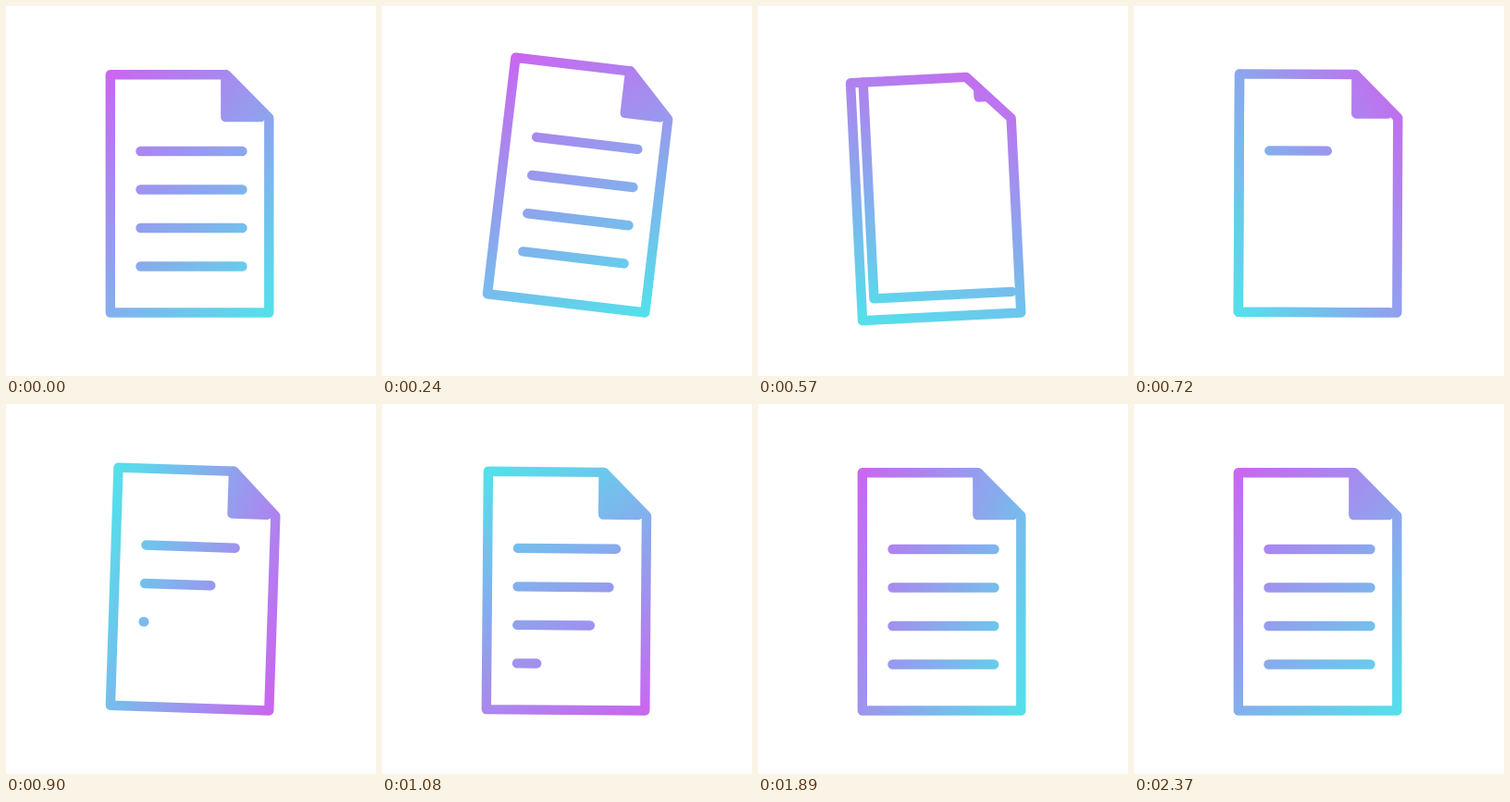
Write an HTML page that moves like this. It is 400 px wide and 400 px high and loops after 4400 ms.

```html
<!DOCTYPE html>
<html lang="en">
<head>
<meta charset="utf-8">
<title>Page turn</title>
<style>
  html, body { margin: 0; width: 100%; height: 100%; overflow: hidden; background: #fff; }
  svg { display: block; width: 100%; height: 100%; }
  .ink { fill: none; stroke: url(#tint); stroke-width: 10.4; stroke-linecap: round; stroke-linejoin: round; }
</style>
</head>
<body>
<svg viewBox="0 0 400 400">
  <defs>
    <linearGradient id="tint" gradientUnits="userSpaceOnUse">
      <stop offset="0" stop-color="#c967f0"/>
      <stop offset="1" stop-color="#54e0eb"/>
    </linearGradient>
  </defs>
  <g id="doc">
    <path id="oldLines" class="ink"/>
    <g id="turn">
      <path id="back" fill="#fff"/>
      <path id="shade" fill="url(#tint)"/>
      <path id="crease" class="ink"/>
    </g>
    <path id="newLines" class="ink"/>
    <g id="ear">
      <path id="earFill" fill="url(#tint)"/>
      <path id="earEdge" class="ink"/>
    </g>
    <path class="ink" d="M112.8 74.2H238L284.3 121V331.5H112.8Z"/>
  </g>
</svg>
<script>
const LOOP = 4400;
const L = 112.8, T = 74.2, R = 284.3, B = 331.5;
const FOLD = { x: 237.4, y: 120 };
const CUT = { x: 238, y: 121 };
const LINE = { x: 145.5, len: 110, ys: [157, 198.5, 240, 281.5] };
const SWING = [[0, 0], [275, 7], [540, -3], [850, 2], [1200, 0]];

const el = id => document.getElementById(id);
const set = (id, attrs) => {
  for (const k in attrs) el(id).setAttribute(k, attrs[k]);
};
const show = (id, on) => set(id, { visibility: on ? 'visible' : 'hidden' });
const span = (t, start, length) => Math.min(1, Math.max(0, (t - start) / length));
const mix = (a, b, p) => a + (b - a) * p;

const quadInOut = u => u < .5 ? 2 * u * u : 1 - 2 * (1 - u) ** 2;
const powOut = (u, n) => 1 - (1 - u) ** n;
const expoOut = u => u >= 1 ? 1 : 1 - 2 ** (-10 * u);

// cubic-bezier(.3, 0, .5, 1), solved by bisection
function spinEase(u) {
  let lo = 0, hi = 1;
  for (let i = 0; i < 24; i++) {
    const s = (lo + hi) / 2, r = 1 - s;
    if (.9 * s * r * r + 1.5 * s * s * r + s ** 3 < u) lo = s; else hi = s;
  }
  return lo * lo * (3 - 2 * lo);
}

function swing(t) {
  for (let i = 1; i < SWING.length; i++) {
    const [t0, a] = SWING[i - 1], [t1, b] = SWING[i];
    if (t < t1) return mix(a, b, quadInOut(span(t, t0, t1 - t0)));
  }
  return 0;
}

function drawTint(t) {
  const a = (225 + 360 * spinEase(span(t, 0, 2400))) * Math.PI / 180;
  const c = Math.cos(a), s = Math.sin(a);
  const half = (Math.abs(c) * (R - L) + Math.abs(s) * (B - T)) / 2;
  const cx = (L + R) / 2, cy = (T + B) / 2;
  set('tint', { x1: cx + c * half, y1: cy + s * half, x2: cx - c * half, y2: cy - s * half });
}

function drawTurn(t) {
  const p = powOut(span(t, 247, 484), 2);
  const x = mix(FOLD.x, L, p), y = mix(FOLD.y, B, p);
  const area = `M${x} ${T}H${CUT.x}L${R} ${CUT.y}V${y}H${x}Z`;
  set('back', { d: area });
  set('shade', { d: area, 'fill-opacity': 1 - span(t, 240, 300) });
  set('crease', { d: `M${x} ${T}V${y}H275.4` });
  show('turn', p < 1);
}

function drawEar(t) {
  const k = powOut(span(t, 545, 340), 3);
  const px = x => mix(254, x, k), py = y => mix(90.2, y, k);
  const edge = `M${px(FOLD.x)} ${py(T)}V${py(FOLD.y)}H`;
  set('earFill', { d: edge + `${px(R)}V${py(CUT.y)}L${px(CUT.x)} ${py(T)}Z` });
  set('earEdge', { d: edge + px(275.4) });
  show('ear', k > 0);
}

function lines(grow) {
  return LINE.ys.map((y, i) => {
    const p = grow(i);
    return p > 0 ? `M${LINE.x} ${y}h${LINE.len * p}` : '';
  }).join('');
}

function draw(t) {
  set('doc', { transform: `rotate(${swing(t)} ${R} ${B})` });
  drawTint(t);
  drawTurn(t);
  drawEar(t);
  show('oldLines', t < 600);
  set('newLines', { d: lines(i => expoOut(span(t, 600 + 150 * i, 1000))) });
}

set('oldLines', { d: lines(() => 1) });
const start = performance.now();
function tick() {
  draw((performance.now() - start) % LOOP);
  requestAnimationFrame(tick);
}
tick();
</script>
</body>
</html>
```
